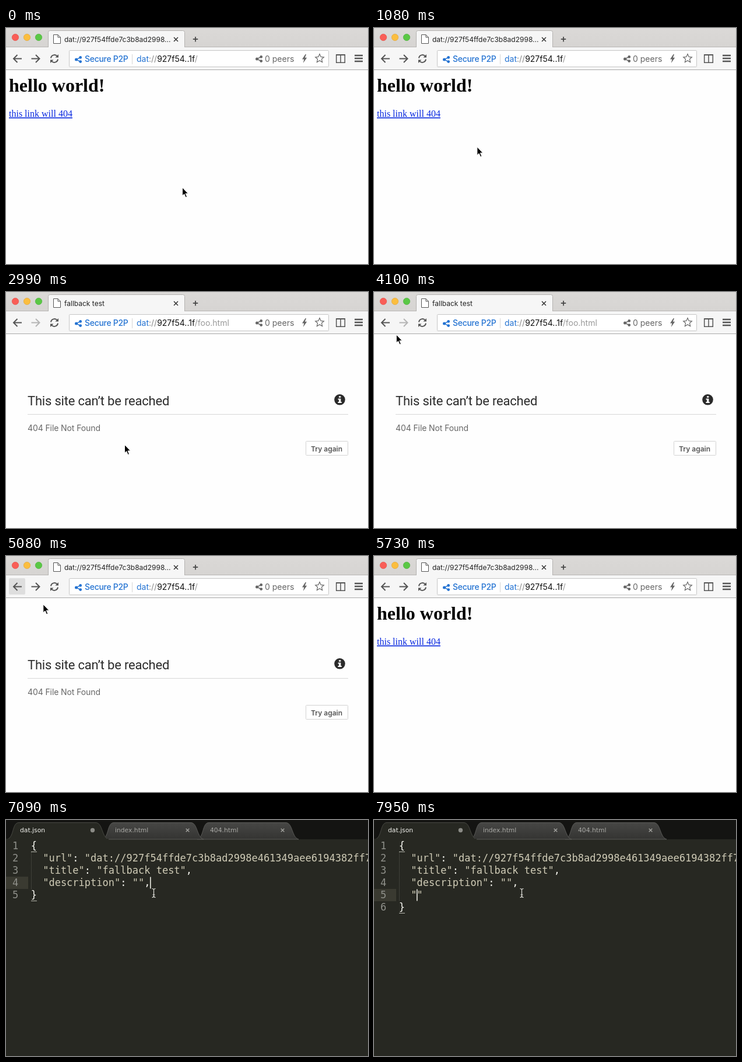
An HTML page for the animation above (8000 ms loop, 621 by 404 pixels).

```html
<!DOCTYPE html>
<html lang="en">
<head>
<meta charset="utf-8">
<title>Fallback page demo</title>
<style>
html, body { margin: 0; width: 100%; height: 100%; overflow: hidden; background: #fff; }
svg { display: block; font: 14px Inter, sans-serif; font-optical-sizing: none; }
text { white-space: pre; }
.line { fill: none; stroke: #555; stroke-width: 2; }
.thin { stroke-width: 1; }
.serif { font-family: "Liberation Serif", serif; }
.code { font: 17px "DejaVu Sans Mono", monospace; fill: #f8f8f2; }
.str { fill: #cfcbb6; }
.num { fill: #8f908a; }
.tabs { font: 10.75px "DejaVu Sans", sans-serif; fill: #a9a9a5; }
</style>
</head>
<body>
<svg width="621" height="404" viewBox="0 0 621 404">
  <defs>
    <g id="share">
      <path d="M9.6 2.4L2.4 6L9.6 9.6" fill="none" stroke="currentColor" stroke-width="1.6"/>
      <g fill="currentColor"><circle cx="2.5" cy="6" r="2.5"/><circle cx="9.7" cy="2.4" r="2.4"/><circle cx="9.7" cy="9.6" r="2.4"/></g>
    </g>
    <path id="arrow" class="line" d="M27 52.5H13.5M19.5 46L13 52.5L19.5 59"/>
    <path id="turn" d="M77 51.5A6.2 6.2 0 0 1 88 48.5" class="line"/>
    <path id="head" d="M90 45V50.5H84.5Z" fill="#555"/>
    <path id="cross" d="M-3.5 -3.5L3.5 3.5M3.5 -3.5L-3.5 3.5" fill="none" stroke="currentColor"/>
    <linearGradient id="bar" x2="0" y2="1"><stop stop-color="#dbd9d7"/><stop offset="1" stop-color="#d6d4d2"/></linearGradient>
    <linearGradient id="tabFill" x2="0" y2="1"><stop stop-color="#474745"/><stop offset="1" stop-color="#343432"/></linearGradient>
    <path id="tab" d="M2 33C14 30 10 4.5 22 4.5H154C166 4.5 164 30 176 33Z"/>
  </defs>

  <g id="browser">
    <rect width="621" height="404" fill="#fefefe"/>
    <rect width="621" height="33" fill="url(#bar)"/>
    <path d="M0 32.5H621" stroke="#b8b6b4"/>
    <circle cx="16" cy="16" r="5.7" fill="#f95e57" stroke="#e2463f" stroke-width=".6"/>
    <circle cx="36" cy="16" r="5.7" fill="#fbbe3f" stroke="#e0a030" stroke-width=".6"/>
    <circle cx="56" cy="16" r="5.7" fill="#5ac845" stroke="#42ac33" stroke-width=".6"/>
    <path d="M72.5 33V7.5Q72.5 4.5 75.5 4.5H303.5Q306.5 4.5 306.5 7.5V33" fill="#f6f6f6" stroke="#b4b2b0"/>
    <rect y="33" width="621" height="38" fill="#f6f6f6"/>
    <path d="M0 71.5H621" stroke="#a9a9a9"/>
    <path id="doc" d="M81.5 11.5H89L93.5 16V26.5H81.5ZM89 11.5V16H93.5" fill="#fff" stroke="#555"/>
    <path id="spinner" d="M90.5 13.2A6.2 6.2 0 1 0 93.7 21.5" class="line" style="stroke:#a5a5a5"/>
    <text id="title" x="100" y="24" font-size="12" fill="#222"></text>
    <use href="#cross" x="291.5" y="19.5" color="#333" stroke-width="1.5"/>
    <path d="M325 15V23.5M320.8 19.2H329.2" stroke="#444" stroke-width="1.7"/>

    <rect id="hover" x="5" y="38" width="28" height="28" rx="2" fill="#dedede"/>
    <use href="#arrow"/>
    <use id="forward" href="#arrow" transform="translate(70.5) scale(-1 1)"/>
    <g id="reload">
      <use href="#turn"/><use href="#head"/>
      <g transform="rotate(180 83 52.5)"><use href="#turn"/><use href="#head"/></g>
    </g>
    <use id="stop" href="#cross" transform="translate(83 52.5) scale(1.2)" color="#555" stroke-width="2"/>

    <rect x="108.5" y="38.5" width="445" height="28" rx="1" fill="#fff" stroke="#c6c6c6"/>
    <g color="#2473d2" fill="#2473d2">
      <use href="#share" x="118" y="48"/>
      <text x="135" y="58" font-weight="500" letter-spacing="-.3">Secure P2P</text>
    </g>
    <path d="M216.5 45V62" stroke="#d4d4d4"/>
    <text x="224" y="58" fill="#888"><tspan fill="#2473d2">dat</tspan>://<tspan fill="#111">927f54..1f</tspan><tspan id="path" fill="#999"></tspan></text>
    <use href="#share" x="428" y="47" color="#666"/>
    <text x="444" y="58" fill="#666">0 peers</text>
    <path d="M513.5 45L508 53.5H511.3L509.8 60L516.2 50.8H512.8L515 45Z" fill="#666"/>
    <path d="M538 44.5L540.2 49.4L545.3 49.9L541.5 53.3L542.6 58.5L538 55.8L533.4 58.5L534.5 53.3L530.7 49.9L535.8 49.4Z" fill="none" stroke="#666" stroke-width="1.2"/>
    <path d="M566.7 45.7H581.3V59.3H566.7ZM574 46V59" class="line" style="stroke-width:1.5"/>
    <path d="M566 46H582" class="line"/>
    <path d="M598 47H612M598 52H612M598 57H612" class="line" style="stroke-width:2.4"/>

    <g id="hello" class="serif">
      <text x="5" y="109" font-size="32" font-weight="bold">hello world!</text>
      <text x="5" y="152" font-size="16" fill="#0828e0" text-decoration="underline">this link will 404</text>
    </g>
    <g id="error">
      <text x="37" y="194" style="font:22px Roboto,sans-serif;letter-spacing:-.2px" fill="#2c2c2c">This site can’t be reached</text>
      <circle cx="572.5" cy="184.3" r="9.3" fill="#2a2a2a"/>
      <path d="M571 178.2H574.4V180.8H571ZM569.6 182.4H574.4V188H575.8V190H569.4V188H571V184.4H569.6Z" fill="#fff"/>
      <path d="M37 209.5H587" stroke="#d8d8d8"/>
      <text x="37" y="238" fill="#666" letter-spacing="-.1">404 File Not Found</text>
      <rect x="514.5" y="255.5" width="72" height="24" rx="1" fill="#fff" stroke="#d2d2d2"/>
      <text x="523" y="273" font-size="12" font-weight="600" fill="#555">Try again</text>
    </g>
    <g id="status">
      <path d="M-1 388.5H294.5Q296.5 388.5 296.5 390.5V405H-1Z" fill="#ececec" stroke="#b9b9b9"/>
      <text x="3" y="402" font-size="11.5" fill="#333">Loading...</text>
    </g>
  </g>

  <g id="editor">
    <rect width="621" height="404" fill="#272822"/>
    <rect width="621" height="33" fill="#141412"/>
    <g fill="url(#tabFill)" stroke="#5a5a57">
      <use href="#tab" x="326"/><use href="#tab" x="163"/>
    </g>
    <use href="#tab" fill="#272822" stroke="#484943"/>
    <path d="M0 33H176" stroke="#272822" stroke-width="2"/>
    <g class="tabs">
      <text x="24" y="21" fill="#f4f4f0">dat.json</text>
      <text x="187" y="21">index.html</text>
      <text x="350" y="21">404.html</text>
    </g>
    <g color="#a2a29e" stroke-width="1.7">
      <use id="close" href="#cross" transform="translate(148.5 17.5) scale(.8)"/>
      <use href="#cross" transform="translate(311.5 17.5) scale(.8)"/>
      <use href="#cross" transform="translate(474.5 17.5) scale(.8)"/>
    </g>
    <circle id="unsaved" cx="148.5" cy="17.5" r="3.7" fill="#8b8b86"/>
    <rect id="rowMark" width="38" height="21" fill="#3a3a31"/>
    <path id="guide" stroke="#55564e" stroke-dasharray="1 1"/>
    <g id="code" class="code"></g>
    <path id="braces" stroke="#b9b9b0"/>
    <rect id="caret" width="1.5" height="20" fill="#f8f8f0"/>
  </g>

  <path id="pointer" d="M0 0V14.2L3.2 11.2L5.7 17L8 16L5.5 10.4H10Z" fill="#000" stroke="#fff"/>
  <path id="hand" d="M-2 1Q-2 -.6 -.5 -.6Q1 -.6 1 1V6Q2.5 4.6 4 6Q5.6 5 6.5 6.6Q8.5 6 8.5 8V11L7 15.5H-.5L-5 9.5Q-5.6 7.3 -4 7.4L-2 9.5Z M1 6V9M4 6.3V9M6.5 6.8V9" fill="#fff" stroke="#000" stroke-width="1.1"/>
  <path id="beam" d="M-3 -7.5Q0 -7.5 0 -5V5Q0 7.5 -3 7.5M3 -7.5Q0 -7.5 0 -5M0 5Q0 7.5 3 7.5M-2 3H2" fill="none" stroke="#e4e4de" stroke-width="1.2"/>
</svg>
<script>
const LOOP = 8000, LEFT = 42.7, CELL = 10.235, TOP = 34, ROW = 21;
const el = id => document.getElementById(id);
const show = (id, on) => { el(id).style.display = on ? '' : 'none'; };
const smooth = p => p * p * (3 - 2 * p);
const brake = p => 1 - (1 - p) ** 2.8;

// start, end, from x, y, to x, y, easing
const moves = [
  [750, 1340, 302.5, 273, 90, 155.5, smooth],
  [2800, 2990, 90, 155.5, 203.5, 261.5, smooth],
  [3770, 4360, 203.5, 261.5, 20, 52, brake],
  [5000, 5330, 20, 52, 310, 255.5, smooth],
  [5600, 5730, 310, 255.5, 628, 271, p => p],
  [6520, 6860, 585, 247, 253.5, 125, smooth]
];

function mouseAt(t) {
  const started = moves.filter(m => t >= m[0]);
  const [from, to, x, y, x2, y2, ease] = t >= 6170 && t < 6520 ? moves[5] : started.pop() || moves[0];
  const p = ease(Math.min(1, Math.max(0, (t - from) / (to - from))));
  return [x + (x2 - x) * p, y + (y2 - y) * p];
}

function drawBrowser(t) {
  const within = (a, b) => t >= a && t < b;
  const loading = within(1580, 2320) || within(4750, 4950);
  const failed = within(2000, 5150);
  el('title').textContent = within(2000, 4750) ? 'fallback test' : 'dat://927f54ffde7c3b8ad2998...';
  el('path').textContent = within(1580, 4750) ? '/foo.html' : '/';
  el('forward').style.opacity = within(2000, 4750) ? .4 : 1;
  el('spinner').setAttribute('transform', `rotate(${(t - 1750) * .5} 88 19)`);
  show('spinner', loading);
  show('doc', !loading);
  show('stop', loading);
  show('reload', !loading);
  show('status', loading);
  show('hover', within(4190, 5110));
  show('error', failed);
  show('hello', !failed);
}

function drawEditor(t) {
  const comma = t >= 7090, entered = t >= 7470, quoted = t >= 7820;
  const lines = [
    '{',
    '  "url": "dat://927f54ffde7c3b8ad2998e461349aee6194382ff7',
    '  "title": "fallback test",',
    '  "description": ""' + (comma ? ',' : ''),
    ...(entered ? [quoted ? '  ""' : ''] : []),
    '}'
  ];
  el('code').innerHTML = lines.map((line, i) => {
    const y = TOP + 16 + ROW * i;
    const text = line.replace(/"[^"]*("|$)/g, s => `<tspan class="str">${s}</tspan>`);
    return `<text class="num" x="11" y="${y}">${i + 1}</text><text x="${LEFT}" y="${y}">${text}</text>`;
  }).join('');
  const row = entered ? 4 : 3, col = quoted ? 3 : entered ? 2 : comma ? 20 : 19;
  const last = TOP + ROW * lines.length - .5;
  el('rowMark').setAttribute('y', TOP + ROW * row);
  el('caret').setAttribute('x', LEFT + CELL * col - .3);
  el('caret').setAttribute('y', TOP + ROW * row + .5);
  el('guide').setAttribute('d', `M43.5 55V${quoted ? 139 : 118}`);
  el('braces').setAttribute('d', `M43 54.5H53M43 ${last}H53`);
  show('braces', t >= 6170);
  show('caret', t >= 6170 && !(t >= 6700 && t < 7090));
  show('close', !comma);
  show('unsaved', comma);
}

function draw(t) {
  const editing = t >= 6150;
  show('browser', !editing);
  show('editor', editing);
  (editing ? drawEditor : drawBrowser)(t);
  const [x, y] = mouseAt(t);
  const onLink = t < 2800 && x < 114 && y < 160;
  show('pointer', !editing && !onLink);
  show('hand', onLink);
  show('beam', t >= 6170);
  for (const id of ['pointer', 'hand', 'beam']) el(id).setAttribute('transform', `translate(${x} ${y})`);
}

function tick() {
  draw(performance.now() % LOOP);
  requestAnimationFrame(tick);
}
tick();
</script>
</body>
</html>
```
